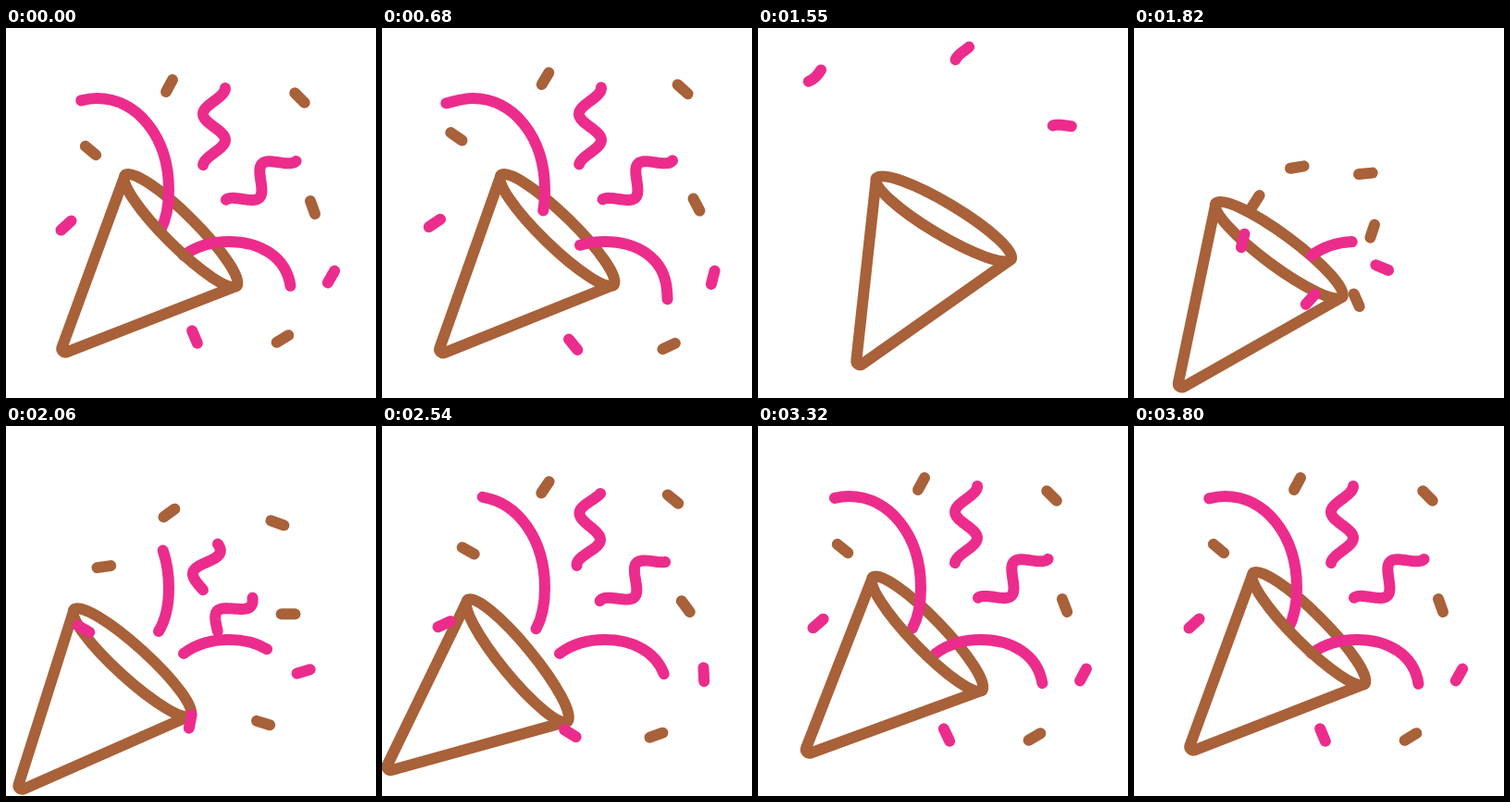
An HTML page with a canvas for the animation above (3830 ms loop, 400x400 px).

```html
<!DOCTYPE html>
<html lang="en">
<head>
<meta charset="utf-8">
<title>Party popper</title>
<style>
html, body { margin: 0; width: 100%; height: 100%; overflow: hidden; background: #fff; }
canvas { display: block; width: 100vmin; height: 100vmin; }
</style>
</head>
<body>
<canvas id="stage" width="400" height="400"></canvas>
<script>
const ctx = document.getElementById('stage').getContext('2d');
const SIZE = 400, BROWN = '#a86139', PINK = '#ec2c8c';
const LOOP = 3830, HOLD = 530, STEP = 30;

// Lean back, kick, recoil, settle
const START = 515, KICK = 1605, BITS_OUT = 1650, BACK = 2100, REST = 3640;
const LEAN = { x: 11.7, y: -13, turn: -14 };
const RECOIL = { x: -53, y: 37, turn: 5.8 };
const MOUTH = { x: 190, y: 218.5 }, BURST = { x: 176, y: 248 };

// Bits at rest: colour, x, y, angle, spin
const bits = [
  [BROWN, 176.5, 62.5, -62, 26],
  [BROWN, 317.5, 75.5, 45, -25],
  [BROWN, 91.5, 132.5, 40, -48],
  [BROWN, 331.5, 194, 70, -70],
  [BROWN, 299, 336, -31, 48],
  [PINK, 65, 213.5, -42, 72],
  [PINK, 351.5, 269, 120, -137],
  [PINK, 204, 334, 67, -146]
];

const ribbonA = new Path2D('M165 222C173 209 176 195 176 175C176 118 142 76 98 76' +
  'C82 76 72 83 54 83C32 83 16 72 11 55C4 32 18 10 42 10C66 10 78 28 70 42C66 50 60 56 54 58L40 62');
const ribbonB = new Path2D('M192 246C208 234 225 231 241 231C275 231 305 248 308 283' +
  'C311 315 304 348 276 364C258 374 240 395 235 430');

const rad = deg => deg * Math.PI / 180;
const mix = (a, b, k) => a + (b - a) * k;
const part = (t, a, b) => Math.min(1, Math.max(0, (t - a) / (b - a)));
const smooth = q => q * q * (3 - 2 * q);
const easeOut = (q, n) => 1 - (1 - q) ** n;
// Share of the way in still to go, 1 at 2060 ms
const left = (t, rate) => Math.max(0, (Math.exp(-rate * (t - 2060) / 480) - 0.01) / 0.99);
// Progress of the way out, 1 at 1070 ms and growing
const gone = (t, power) => Math.max(0, (t - START) / 555) ** power;

function conePose(t) {
  if (t < KICK) {
    const s = smooth(part(t, START, KICK) ** 1.1);
    return { x: LEAN.x * s, y: LEAN.y * s, turn: LEAN.turn * s };
  }
  const kick = easeOut(part(t, KICK, BACK), 2);
  const swing = easeOut(part(t, KICK, 2540), 1.3);
  const stay = from => 1 - smooth(part(t, from, REST));
  return {
    x: mix(LEAN.x, RECOIL.x, kick) * stay(BACK),
    y: mix(LEAN.y, RECOIL.y, kick) * stay(2350),
    turn: mix(LEAN.turn, RECOIL.turn, swing) * stay(2540)
  };
}

function inCone(pose, shape) {
  ctx.save();
  ctx.translate(MOUTH.x + pose.x, MOUTH.y + pose.y);
  ctx.rotate(rad(pose.turn));
  ctx.strokeStyle = BROWN;
  ctx.beginPath();
  shape();
  ctx.stroke();
  ctx.restore();
}

const rim = (from, to) => ctx.ellipse(-1, 0.5, 85, 17, rad(44.8), from, to);
const coneBack = () => rim(Math.PI, 2 * Math.PI);

function coneFront() {
  rim(0, Math.PI);
  ctx.arcTo(-132.5, 135, 59, 62.5, 4);
  ctx.closePath();
}

// Part of a path, by length along it
function ribbon(path, from, to) {
  from = Math.max(0, from);
  if (to - from < 1) return;
  ctx.strokeStyle = PINK;
  ctx.setLineDash([to - from, 9999]);
  ctx.lineDashOffset = -from;
  ctx.stroke(path);
  ctx.setLineDash([]);
}

// Part of a wave that runs along a tilted axis
function squiggle(x, y, angle, from, to) {
  if (to - from < 1) return;
  ctx.save();
  ctx.translate(x, y);
  ctx.rotate(rad(angle));
  ctx.strokeStyle = PINK;
  ctx.beginPath();
  for (let i = 0; i <= 60; i++) {
    const u = mix(from, to, i / 60);
    ctx.lineTo(u - 42, -12 * Math.cos(Math.PI * u / 28));
  }
  ctx.stroke();
  ctx.restore();
}

function bit(color, x, y, angle) {
  const dx = 7.4 * Math.cos(rad(angle)), dy = 7.4 * Math.sin(rad(angle));
  ctx.strokeStyle = color;
  ctx.beginPath();
  ctx.moveTo(x - dx, y - dy);
  ctx.lineTo(x + dx, y + dy);
  ctx.stroke();
}

function streamersOut(t) {
  const w = gone(t, 1.57);
  ribbon(ribbonA, 4 + 152 * w, 206 + 83 * w);
  ribbon(ribbonB, 166 * w, 142 + 96 * w);
  const from = 1 + 20.5 * gone(t, 2.75), to = 84 + 11 * gone(t, 2.24);
  squiggle(225, 107, -90, from, to);
  squiggle(275.4, 165.1, -45, from, to);
}

function streamersIn(t) {
  const p = left(t, 2.04), r = left(t, 1.4);
  ribbon(ribbonA, 4 - 4 * r, 206 - 116 * r);
  ribbon(ribbonB, 0, 142 - 47 * r);
  const from = 1 - 17 * p, to = 84 - 48 * p;
  squiggle(225 - 2 * p, 107 + 13 * p, -90 + 12.6 * r, from, to);
  squiggle(275.4 - 10.6 * p, 165.1 + 11.3 * p, -45 - 4 * r, from, to);
}

// How far along its ray a bit must go to pass the edge of the stage
function reach(x, y, rx, ry) {
  const gap = (v, dir) => ((dir > 0 ? SIZE - v : v) + 7) / Math.abs(dir);
  return Math.min(gap(x, rx), gap(y, ry));
}

function drawBits(t) {
  const out = t < KICK;
  if (!out && t < BITS_OUT) return;
  const turn = out ? gone(t, 1.8) : left(t, 1.4);
  for (const [color, x, y, angle, spin] of bits) {
    const rx = x - BURST.x, ry = y - BURST.y;
    const far = out ? turn * reach(x, y, rx, ry) : -0.17 * left(t, 2.04);
    bit(color, x + rx * far, y + ry * far, angle + spin * turn);
  }
}

function draw(t) {
  const pose = conePose(t);
  ctx.fillStyle = '#fff';
  ctx.fillRect(0, 0, SIZE, SIZE);
  ctx.lineWidth = 12;
  ctx.lineCap = ctx.lineJoin = 'round';
  inCone(pose, coneBack);
  if (t < KICK) streamersOut(t); else streamersIn(t);
  inCone(pose, coneFront);
  drawBits(t);
}

const t0 = performance.now();
function frame() {
  const t = (performance.now() - t0) % LOOP;
  draw(t < HOLD ? 0 : HOLD + STEP * Math.floor((t - HOLD) / STEP));
  requestAnimationFrame(frame);
}
frame();
</script>
</body>
</html>
```
